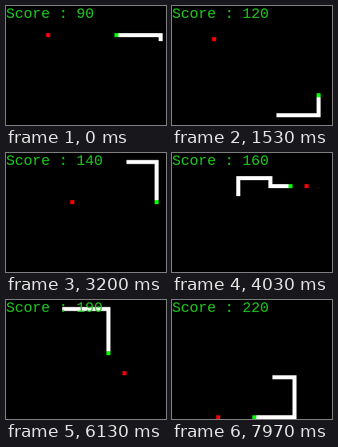
These frames come from a looping animation (200 by 149 pixels, 8000 ms). An HTML page with a canvas:

```html
<!DOCTYPE html>
<html lang="en">
<head>
<meta charset="utf-8">
<title>Snake</title>
<style>
  html, body { margin: 0; width: 100%; height: 100%; overflow: hidden; background: #000; }
  canvas { display: block; position: absolute; left: 0; top: 0; }
  #score {
    position: absolute; left: 0; top: 2px;
    font: 18.33px/18px "Liberation Mono", monospace;
    color: #1fc81f; white-space: pre;
  }
</style>
</head>
<body>
<canvas id="board" width="200" height="149"></canvas>
<div id="score">Score : 90</div>
<script>
const LOOP = 8000, CELL = 5.02, TOP = 3.8;
const START_SCORE = 90, START_LENGTH = 13;
const ctx = document.getElementById('board').getContext('2d');
const label = document.getElementById('score');

// Food cells in the order they are eaten: [column, row]
const foods = [
  [10, 6], [5, 16], [36, 26], [10, 7], [37, 1], [16, 11], [24, 5],
  [33, 7], [5, 25], [25, 1], [29, 17], [10, 6], [30, 18], [11, 28]
];

const path = [[38, 7]];

function walk(axis, goal) {
  let cell = path[path.length - 1];
  while (cell[axis] !== goal) {
    cell = cell.slice();
    cell[axis] += Math.sign(goal - cell[axis]);
    path.push(cell);
  }
}

// The snake always lines up vertically first, then runs sideways.
function seek([col, row]) {
  walk(1, row);
  walk(0, col);
  return path.length - 1;
}

const start = seek([27, 6]);
const mealSteps = foods.map(seek);

// Cells share one path, so soft edges leave no seams between them.
function drawCells(cells, color) {
  ctx.fillStyle = color;
  ctx.beginPath();
  for (const [col, row] of cells) ctx.rect(col * CELL, TOP + row * CELL, CELL, CELL);
  ctx.fill();
}

// The picture refreshes 30 times a second; the snake takes 50 steps a second.
function headStep(ms) {
  const tick = Math.floor(Math.floor(ms / 10) * 0.3 + 0.15);
  return start + Math.floor(tick * 5 / 3 + Math.min(1.45, tick / 20) + 1e-6);
}

function draw(ms) {
  const head = headStep(ms);
  const eaten = mealSteps.filter(step => step <= head).length;
  const tail = head - (START_LENGTH + eaten) + 1;

  ctx.globalCompositeOperation = 'source-over';
  ctx.fillStyle = '#000';
  ctx.fillRect(0, 0, 200, 149);
  ctx.globalCompositeOperation = 'lighter';
  drawCells([foods[eaten]], '#f00');
  drawCells(path.slice(Math.max(0, tail), head), '#fff');
  drawCells([path[head]], '#0f0');

  const text = 'Score : ' + (START_SCORE + eaten * 10);
  if (label.textContent !== text) label.textContent = text;
}

const origin = performance.now();
function frame() {
  draw((performance.now() - origin) % LOOP);
  requestAnimationFrame(frame);
}
frame();
</script>
</body>
</html>
```
